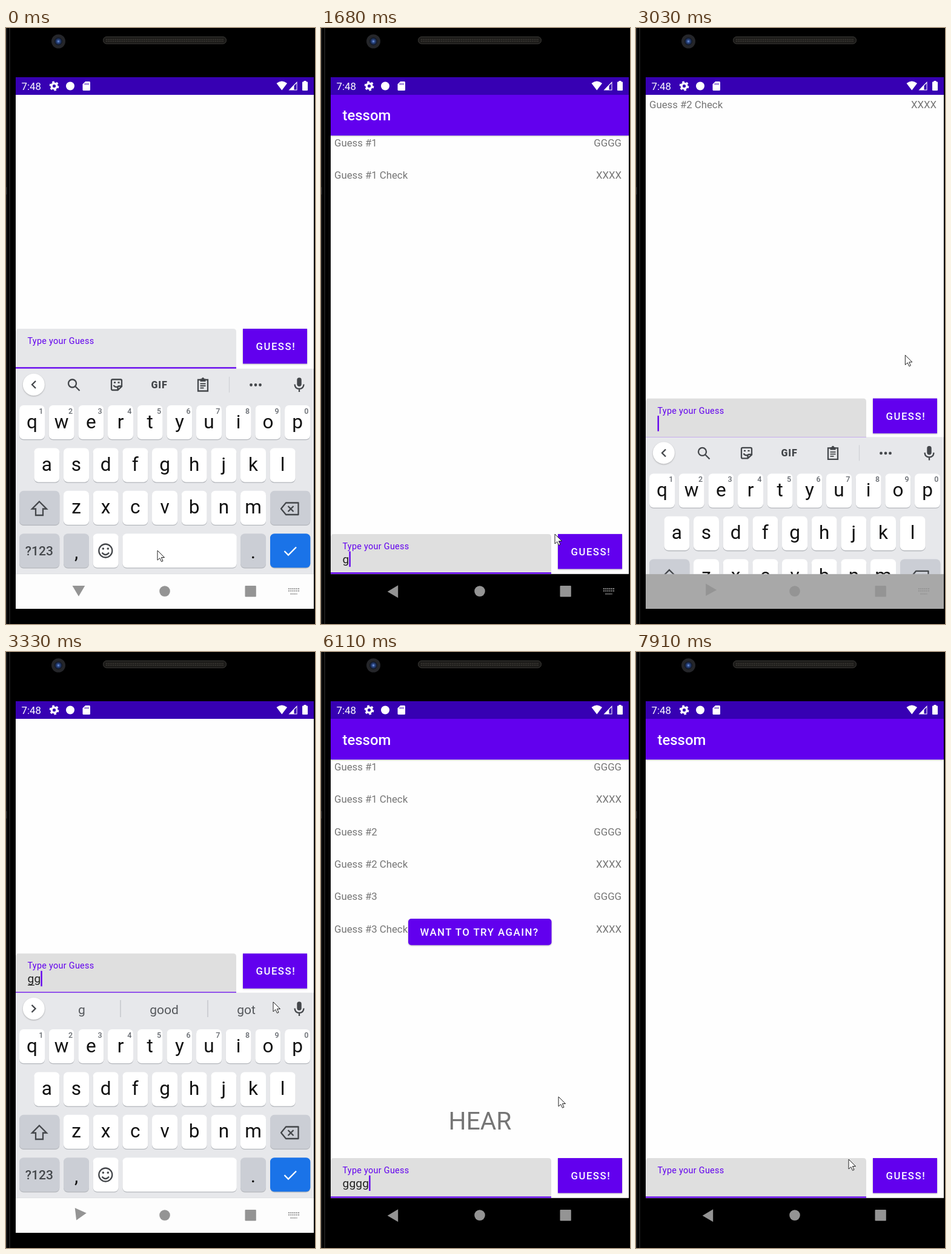
These frames come from a looping animation (510 by 981 pixels, 8 s). An HTML page:

```html
<!DOCTYPE html>
<html lang="en">
<head>
<meta charset="utf-8">
<title>Guessing game on a phone</title>
<style>
html, body { margin: 0; height: 100%; overflow: hidden; background: #000; }
svg { display: block; width: 100vw; height: 100vh; font-family: Roboto, sans-serif; }
.mid { text-anchor: middle; }
.end { text-anchor: end; }
.row { font-size: 16.76px; fill: #757575; }
.btn { font-size: 16.76px; font-weight: 500; letter-spacing: 1.52px; fill: #fff; }
.letter { font-size: 31.5px; fill: #111; text-anchor: middle; }
.digit { font-size: 12.5px; font-weight: 500; fill: #666a70; text-anchor: middle; }
.word { font-size: 21px; fill: #55585c; text-anchor: middle; }
.line { fill: none; stroke: #44474b; stroke-width: 2.3; }
.raised { filter: drop-shadow(0 1.5px 1px #0004); }
</style>
</head>
<body>
<svg viewBox="0 0 510 981" preserveAspectRatio="none">
  <defs>
    <clipPath id="appClip"><path d="M16 110H508V898.8H16Z"/></clipPath>
    <radialGradient id="lens"><stop offset="0" stop-color="#7fa4e8"/><stop offset=".35" stop-color="#2c4a8c"/><stop offset="1" stop-color="#0c1018"/></radialGradient>
    <pattern id="mesh" width="3" height="3" patternUnits="userSpaceOnUse"><path d="M0 0H1.5V1.5H0Z" fill="#45433e"/></pattern>
  </defs>

  <rect width="510" height="981"/>
  <path d="M1 0V981M6 0V981" stroke="#1b1b1b" stroke-width="2"/>
  <path d="M0 262V274" stroke="#333" stroke-width="3"/>
  <circle cx="86.5" cy="22" r="11.5" fill="#25262a"/>
  <circle cx="86.5" cy="22" r="6.5" fill="url(#lens)"/>
  <rect x="160.5" y="14.5" width="203" height="11.5" rx="5.5" fill="#1c1b19" stroke="#3a3936"/>
  <rect x="164" y="17" width="196" height="7" rx="3" fill="url(#mesh)"/>

  <path d="M16 81H508V110H16Z" fill="#3700b3"/>
  <g fill="#fff">
    <text x="25.5" y="102" font-size="16.8">7:48</text>
    <circle cx="79.5" cy="95.5" r="4.3" fill="none" stroke="#fff" stroke-width="3.4"/>
    <circle cx="79.5" cy="95.5" r="6.6" fill="none" stroke="#fff" stroke-width="2.6" stroke-dasharray="3.456"/>
    <circle cx="106" cy="95.5" r="7"/>
    <path d="M131 88H137.5Q139 88 139 89.5V101.5Q139 103 137.5 103H128Q126.5 103 126.5 101.5V92.5Z"/>
    <path d="M130.5 91V93.5M133 91V93.5M135.5 91V93.5" stroke="#3700b3" stroke-width="1.2"/>
    <path d="M446.5 91Q455.3 84 464 91L455.3 102.5Z"/>
    <path d="M480.5 88V102.5H466.5Z"/>
    <path d="M475.5 95V101.5H479.5V91Z" fill="#3700b3"/>
    <path d="M491.5 87H495.5V88.5H497Q498 88.5 498 89.5V102Q498 103 497 103H490Q489 103 489 102V89.5Q489 88.5 490 88.5H491.5Z"/>
  </g>

  <g clip-path="url(#appClip)">
    <path d="M16 110H508V899H16Z" fill="#fefefe"/>
    <g id="app">
      <path d="M16 110H508V177H16Z" fill="#6200ee" class="raised"/>
      <text x="35.5" y="152.5" font-size="23.9" font-weight="500" fill="#fff">tessom</text>
      <g id="rows" class="row"></g>
      <g id="over">
        <text x="262.5" y="785.5" font-size="40.7" fill="#757575" class="mid">HEAR</text>
        <rect id="again" x="144" y="439" width="236.5" height="43.5" rx="5" class="raised"/>
        <text x="163.5" y="467" class="btn">WANT TO TRY AGAIN?</text>
      </g>
      <path id="field" d="M16 898.8V838Q16 833 21 833H375Q380 833 380 838V898.8Z"/>
      <path d="M16 897.5H380" stroke="#6200ee" stroke-width="2.6"/>
      <text x="35.5" y="858" font-size="14.36" letter-spacing=".3" fill="#6200ee">Type your Guess</text>
      <text id="typed" x="35.5" y="881" font-size="19.15" letter-spacing=".18" fill="#222"></text>
      <rect id="under" x="36" y="884.5" height="1.2" fill="#222"/>
      <rect id="caret" y="861.5" width="2.4" height="25.5" fill="#6200ee"/>
      <rect id="guess" x="391" y="833" width="106" height="57.5" class="raised"/>
      <text x="412.5" y="868" class="btn">GUESS!</text>
    </g>
  </g>

  <path id="navBar" d="M16 898.8H508V956H16Z" fill="#fdfdfd"/>
  <g clip-path="url(#appClip)"><g id="keyboard">
    <path d="M16 560.8H508V900H16Z" fill="#e7e8eb"/>
    <g id="words">
      <path id="chosen" d="M62 560.8H189V613.5H62Z" fill="#d9dbde"/>
      <path d="M189 573V601M333 573V601" stroke="#c0c3c8" stroke-width="1.3"/>
      <text class="word" x="125" y="596"></text>
      <text class="word" x="261" y="596"></text>
      <text class="word" x="396.5" y="596"></text>
    </g>
    <g id="tools">
      <circle cx="109.5" cy="585" r="6.5" class="line"/>
      <path d="M114.5 590L121.5 597" class="line"/>
      <path d="M176 578.5H189Q191 578.5 191 580.5V590L184.5 596H176Q174 596 174 594V580.5Q174 578.5 176 578.5ZM191 589.5H186.5Q184.5 589.5 184.5 591.5V596M177.5 588Q180 592 184 590.5M178 583.5H181M184.5 583.5H187.5" class="line"/>
      <text x="253" y="592.5" font-size="16" font-weight="900" letter-spacing=".8" fill="#44474b" class="mid">GIF</text>
      <path d="M317 579H333V597.5H317Z" class="line"/>
      <path d="M320.5 577.5H322.5Q325 573 327.5 577.5H329.5V582H320.5Z" fill="#44474b"/>
      <path d="M320.5 585.5H329.5M320.5 589H329.5M320.5 592.5H326.5" class="line" style="stroke-width:1.8"/>
      <path d="M368.5 574V600" stroke="#cfd1d5" stroke-width="1.2"/>
      <path d="M404.5 587.5H420" stroke="#44474b" stroke-width="4.8" stroke-linecap="round" stroke-dasharray="0 7.5"/>
    </g>
    <circle cx="45.8" cy="587" r="18" fill="#fff" class="raised"/>
    <path id="chevron" class="line"/>
    <rect x="480.3" y="575.5" width="7.4" height="14.5" rx="3.7" fill="#44474b"/>
    <path d="M476.5 586.5Q477 594 484 594T491.5 586.5M484 594V599" class="line"/>
    <g id="keys"></g>
    <g class="line">
      <path d="M55 779.5L67 791.5H61V802H49V791.5H43Z"/>
      <path d="M462 781.5H482.5V801H462L454 791.2Z" stroke-linejoin="round"/>
      <path d="M465.5 787L474.5 796M474.5 787L465.5 796"/>
      <circle cx="164.3" cy="860.5" r="11"/>
      <path d="M158.5 863.5Q164.3 870.5 170 863.5"/>
    </g>
    <path d="M160.3 857H169" stroke="#44474b" stroke-width="3.6" stroke-linecap="round" stroke-dasharray="0 8"/>
    <text x="54.8" y="868" font-size="21" font-weight="500" fill="#44474b" class="mid">?123</text>
    <path d="M459.5 861L466 867.5L479 854.5" fill="none" stroke="#fff" stroke-width="2.3"/>
  </g></g>

  <g fill="#949494">
    <path id="back" d="M109.5 918H130.3L119.9 935.5Z"/>
    <circle cx="262" cy="927" r="8.8"/>
    <rect x="394.5" y="918" width="18.3" height="18.3" rx="1"/>
    <path id="imeIcon" d="M466 923H484M466 926.5H484M469.5 931.5H480.5" stroke="#949494" stroke-width="1.9" stroke-dasharray="2 1.2"/>
  </g>
  <path id="mouse" d="M0 0V16L3.8 12.5L6.5 18.3L9 17.2L6.4 11.5H11.5Z" fill="#fff" stroke="#222"/>
</svg>

<script>
const $ = id => document.getElementById(id);
const set = (id, name, value) => $(id).setAttribute(name, value);
const show = (id, on) => set(id, 'display', on ? 'inline' : 'none');

const LOOP = 8000;
const TICK = 138.3;                   // the screen refreshes, and a letter is typed, once per tick
const STARTS = [270, 1658, 3165];     // first letter of each guess
const SUBMITS = [1240, 2740, 3880];   // presses of the guess button
const RESET = 7190;                   // press of the try-again button
const DROP = 420, RISE = 160, TURN = 233, PAN = 338;

// Keyboard keys
const PITCH = 48.67, rowY = r => 621 + 70.4 * r;
const key = (x, y, w = 42, fill = '#fff') => ['#b4b7bc', fill].map((color, i) =>
  `<rect x="${x}" y="${y + 1.3 * (1 - i)}" width="${w}" height="56" rx="7" fill="${color}"/>`).join('');
const letter = (c, x, y) => `<text class="letter" x="${x + 21}" y="${y + 37.5}">${c}</text>`;
const GREY = '#cbced5', SIDE = 66.3;
let keys = '';
['qwertyuiop', 'asdfghjkl', 'zxcvbnm'].forEach((row, r) => [...row].forEach((c, i) => {
  const x = 22 + PITCH * (i + (10 - row.length) / 2), y = rowY(r);
  keys += key(x, y) + letter(c, x, y);
  if (!r) keys += `<text class="digit" x="${x + 35.8}" y="${y + 14}">${(i + 1) % 10}</text>`;
}));
for (const r of [2, 3]) {
  keys += key(22, rowY(r), SIDE, GREY) + key(436, rowY(r), SIDE, r > 2 ? '#1a73e8' : GREY);
}
[',', '', '', '.'].forEach((c, i) => {
  const x = 22 + PITCH * [1.5, 2.5, 3.5, 7.5][i], y = rowY(3);
  keys += key(x, y, i === 2 ? 188.5 : 42, c ? GREY : '#fff') + letter(c, x, y + 3);
});
$('keys').innerHTML = keys;

// Past guesses and their checks
for (let i = 0; i < 6; i++) {
  const y = 195 + 53.3 * i, check = i % 2;
  $('rows').innerHTML += `<g><text x="22" y="${y}">Guess #${(i >> 1) + 1}${check ? ' Check' : ''}</text>` +
    `<text class="end" x="496" y="${y}">${check ? 'XXXX' : 'GGGG'}</text></g>`;
}

// Stops of the mouse: time, x, y
const BUTTON = [445, 531];
const stops = [[0, 250, 860], [1110, ...BUTTON], [1383, ...BUTTON], [1658, 386, 833], [2400, ...BUTTON],
  [2760, ...BUTTON], [3319, 441, 576], [3600, ...BUTTON], [4010, ...BUTTON], [4287, 428, 578],
  [4440, 340, 690], [4990, 325, 715], [5400, 419, 500], [6085, 392, 732], [6900, 280, 455],
  [RESET, 280, 455], [7880, 351, 835]];

const ease = u => (u = Math.min(1, Math.max(0, u)), u * u * (3 - 2 * u));
const sum = (times, t, span) => times.reduce((s, at) => s + ease((t - at) / span), 0);
const past = (times, t) => times.filter(at => at <= t).length;
const justAfter = (at, t) => t >= at && t < at + TICK;
const buttonColor = down => down ? '#8133f1' : '#6200ee';

function mouseAt(t) {
  const i = stops.findLastIndex(s => s[0] <= t), a = stops[i], b = stops[i + 1];
  if (!b) return a.slice(1);
  const u = ease((t - a[0]) / (b[0] - a[0]));
  return [a[1] + (b[1] - a[1]) * u, a[2] + (b[2] - a[2]) * u];
}

function draw(now) {
  const t = Math.floor(now % LOOP / TICK) * TICK;
  const begun = past(STARTS, t), done = past(SUBMITS, t - TICK);
  const over = done === 3, reset = t >= RESET;
  const waiting = done >= begun && !over;
  const n = reset || waiting ? 0 : Math.min(4, 1 + Math.floor((t - STARTS[begun - 1]) / TICK));
  const dropped = sum(SUBMITS, t, DROP), retyped = STARTS.slice(1);
  const up = Math.max(0, 1 - dropped + sum(retyped, t, RISE));
  const angle = 90 * (dropped - sum(retyped, t, TURN));

  set('app', 'transform', `translate(0 ${-PAN * up})`);
  set('keyboard', 'transform', `translate(0 ${PAN * Math.max(0, 1 - up / .99)})`);
  set('navBar', 'opacity', up < .01 ? 0 : Math.min(1, up / .99));
  set('back', 'transform', `rotate(${angle} 118.7 926.5)`);
  set('mouse', 'transform', `translate(${mouseAt(t)})`);
  show('keyboard', up > .01);
  show('imeIcon', !over);

  [...$('rows').children].forEach((row, i) =>
    row.setAttribute('display', !reset && i < 2 * done ? 'inline' : 'none'));
  show('over', over && !reset);
  set('again', 'fill', buttonColor(justAfter(RESET - TICK, t)));
  set('guess', 'fill', buttonColor(SUBMITS.some(at => justAfter(at, t))));
  set('field', 'fill', done ? '#dfdfdf' : '#e6e7e9');

  $('typed').textContent = 'g'.repeat(n);
  set('under', 'width', up > .5 ? 10.9 * Math.max(0, up < .999 ? n - 1 : n) : 0);
  set('caret', 'x', 35.5 + 10.92 * n);
  show('caret', over ? (t - 4080) % 1000 < 500 : t > 0);

  const words = n > 2 ? ['g'.repeat(n), 'ghhh', ''] : ['g', 'good', 'got'];
  document.querySelectorAll('.word').forEach((w, i) => w.textContent = words[i]);
  show('chosen', n === 4);
  show('words', n);
  show('tools', !n);
  set('chevron', 'd', n ? 'M42.5 581L48.5 587L42.5 593' : 'M49 581L43 587L49 593');
}

const start = performance.now();
(function loop() {
  draw(performance.now() - start);
  requestAnimationFrame(loop);
})();
</script>
</body>
</html>
```
